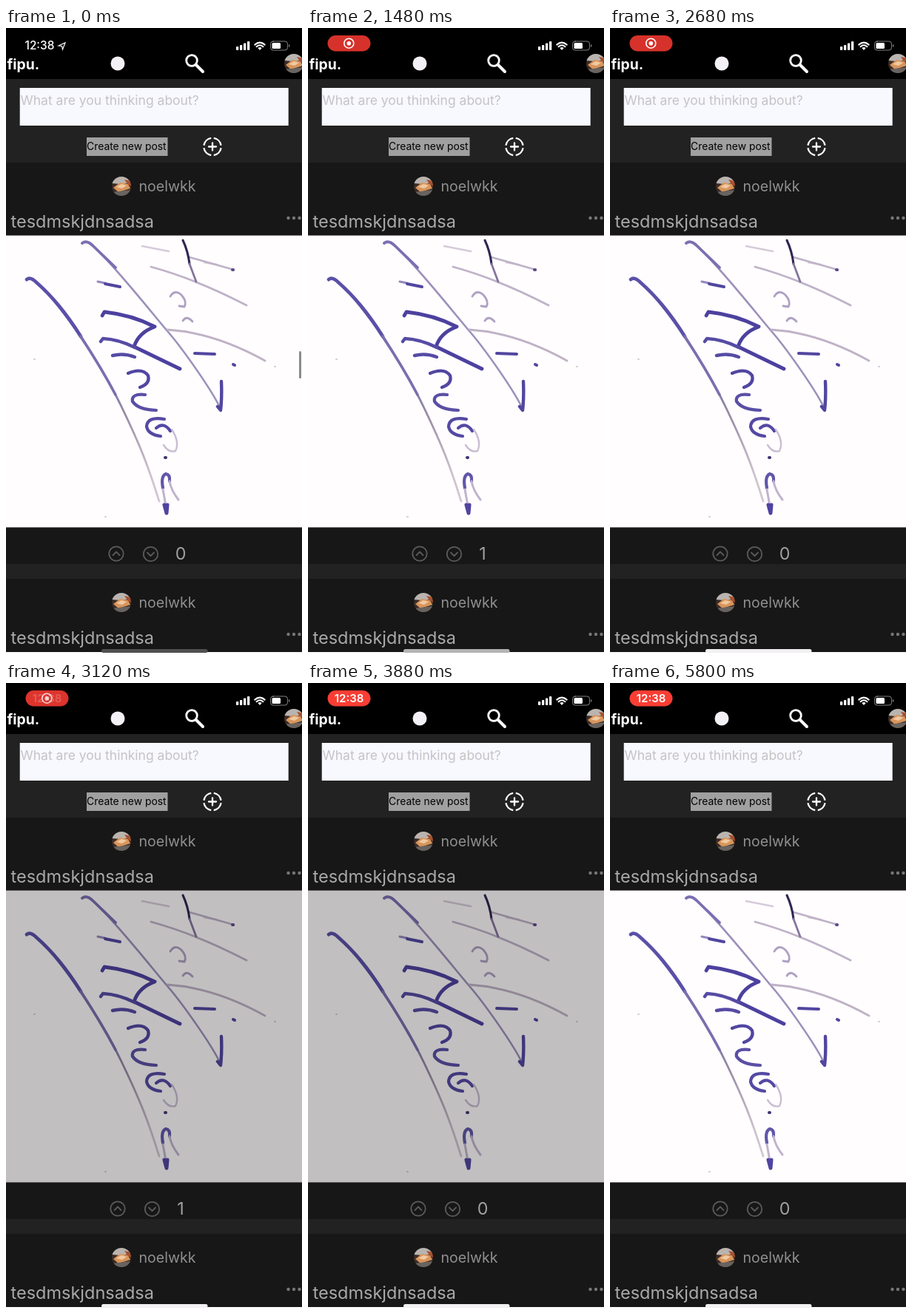
These frames come from a looping animation (400 by 848 pixels, 5840 ms). An HTML page:

```html
<!DOCTYPE html>
<html lang="en">
<head>
<meta charset="utf-8">
<title>Feed</title>
<style>
  html, body { margin: 0; width: 100%; height: 100%; overflow: hidden; background: #000; }
  svg { display: block; width: 100vw; height: 100vh; font-family: Inter, "Open Sans", sans-serif; }
  .line { fill: none; stroke-linecap: round; stroke-linejoin: round; }
</style>
</head>
<body>
<svg viewBox="0 0 400 848" preserveAspectRatio="none">
  <defs>
    <clipPath id="round"><circle r="13"/></clipPath>
    <filter id="soft" filterUnits="userSpaceOnUse" x="0" y="281" width="400" height="394">
      <feGaussianBlur stdDeviation=".6"/>
    </filter>
    <linearGradient id="fade" gradientUnits="userSpaceOnUse" x1="28" y1="340" x2="215" y2="655">
      <stop offset="0" stop-color="#5449a3"/>
      <stop offset=".4" stop-color="#7266ab"/>
      <stop offset=".62" stop-color="#988ca6"/>
      <stop offset=".85" stop-color="#cdc2ce"/>
      <stop offset="1" stop-color="#d5cad7"/>
    </linearGradient>
    <g id="avatar" clip-path="url(#round)">
      <rect x="-13" y="-13" width="26" height="26" fill="#3c2c27"/>
      <path d="M-13-13H13V-5L-2-3L-13-4Z" fill="#b9b4b0"/>
      <path d="M-11 2L-2-5L9-3L12 3L-4 8Z" fill="#d8955c"/>
      <path d="M-7 1L0-3L7-1L1 3Z" fill="#f0c9a0"/>
      <path d="M4-9L13-7V0L8-3Z" fill="#a94f2d"/>
      <path d="M-13 8L13 5V13H-13Z" fill="#69635f"/>
    </g>
    <g id="postHead">
      <use href="#avatar" x="156" y="214"/>
      <text x="179.500" y="221" font-size="19.600" fill="#8f8f8f">noelwkk</text>
      <text x="6.500" y="270" font-size="23.500" fill="#a9a9a9">tesdmskjdnsadsa</text>
      <g fill="#777"><circle cx="381.500" cy="257" r="2.200"/><circle cx="389" cy="257" r="2.200"/><circle cx="396.500" cy="257" r="2.200"/></g>
    </g>
  </defs>

  <rect width="400" height="848" fill="#222"/>
  <rect width="400" height="69" fill="#000"/>

  <!-- status bar -->
  <g id="clock" fill="#fff">
    <text x="25.500" y="29" font-size="15.400" font-weight="500">12:38</text>
    <path d="M71 24L80 20L76.500 29L75.500 24.500Z" fill="none" stroke="#fff" stroke-width="1.200"/>
  </g>
  <g id="pill">
    <rect id="pillBody" x="26.500" y="10" width="58" height="21.500" rx="10.750"/>
    <g id="record" fill="none" stroke="#fff">
      <circle cx="55.300" cy="20.700" r="6.500" stroke-width="1.600"/>
      <circle cx="55.300" cy="20.700" r="2.800" fill="#fff" stroke="none"/>
    </g>
    <text id="pillTime" x="55.500" y="26" font-size="15" font-weight="600" fill="#fff" text-anchor="middle">12:38</text>
  </g>
  <g fill="#fff">
    <rect x="311" y="25" width="3.300" height="5" rx="1"/>
    <rect x="316" y="23" width="3.300" height="7" rx="1"/>
    <rect x="321" y="20.500" width="3.300" height="9.500" rx="1"/>
    <rect x="326" y="18" width="3.300" height="12" rx="1"/>
    <path d="M343 30L340.300 27.100Q343 25 345.700 27.100Z"/>
    <rect x="359.500" y="20" width="11.500" height="8" rx="1.500"/>
    <path d="M382 22v4q1.500-.5 1.500-2t-1.500-2Z" opacity=".5"/>
  </g>
  <g class="line" stroke="#fff" stroke-width="2.100">
    <path d="M336.300 22.600Q343 16.500 349.700 22.600M338.600 25.200Q343 21.300 347.400 25.200"/>
    <rect x="357.500" y="18" width="23" height="12" rx="3.500" stroke-width="1" opacity=".5"/>
  </g>

  <!-- navigation -->
  <text x="1.500" y="56" font-size="19.300" font-weight="700" fill="#fff">fipu.</text>
  <circle cx="151" cy="48" r="9.500" fill="#f4f1f6"/>
  <g class="line" stroke="#fff">
    <circle cx="251" cy="44" r="7.300" stroke-width="2.800"/>
    <path d="M257 50L266 59" stroke-width="4"/>
  </g>
  <use href="#avatar" x="389" y="48"/>

  <!-- composer -->
  <rect x="18.700" y="81" width="363" height="51" fill="#f8f8ff"/>
  <text x="19.500" y="104" font-size="17.500" fill="#c4c4c7">What are you thinking about?</text>
  <rect x="109" y="148" width="109.500" height="25" fill="#a0a0a0"/>
  <text x="109" y="165" font-size="13.900" fill="#000">Create new post</text>
  <g class="line" stroke="#fff" stroke-width="2.300">
    <circle cx="279" cy="160.500" r="11.700" stroke-linecap="butt" pathLength="80" stroke-dasharray="16 4" stroke-dashoffset="-2"/>
    <path d="M274 160.500h10M279 155.500v10"/>
  </g>

  <!-- posts -->
  <rect y="182" width="400" height="543" fill="#171717"/>
  <rect y="745" width="400" height="103" fill="#171717"/>
  <use href="#postHead"/>
  <use href="#postHead" y="563"/>
  <rect y="280.600" width="400" height="394.800" fill="#080808"/>
  <g id="photo">
    <rect y="280.600" width="400" height="394.800" fill="#fffdfe"/>
    <g id="ink" class="line" filter="url(#soft)"></g>
  </g>
  <g id="votes" class="line" stroke="#5a5a5a" stroke-width="1.800">
    <circle cx="149" cy="711" r="9.700"/>
    <path d="M144.500 713L149 708.500L153.500 713"/>
    <circle cx="195.500" cy="711.500" r="9.700"/>
    <path d="M191 709.500L195.500 714L200 709.500"/>
  </g>
  <text id="count" x="236" y="719" font-size="23.300" fill="#a0a0a0" text-anchor="middle">0</text>
  <rect y="844" width="400" height="4" fill="#fff"/>
  <rect id="scrollbar" x="396" y="437" width="3" height="37" rx="1.500" fill="#8a8a8a"/>
  <rect id="home" x="129" y="840" width="143.500" height="5" rx="2.500"/>
</svg>
<script>
const LOOP = 5840;
const TAPS = [[520, 760], [2000, 2130], [2840, 2970], [3600, 3730]];
const PRESSED = 0.2;
const el = id => document.getElementById(id);

// colour, width, path of each pen stroke
const STROKES = [
  ["url(#fade)", 2.8, "M28 341Q32 335 41 344C76 375 130 458 156 512S192 592 207 640"],
  ["#5b50a8", 4.6, "M28 340Q33 336 41 344Q73 372 101 417"],
  ["#7b6faf", 3.6, "M101 417Q129 460 148 496"],
  ["#9c90bb", 2.6, "M103 291Q109 286 118 295C150 325 200 389 219 411S277 488 289 513"],
  ["#7a6fb2", 3.8, "M103 291Q109 286 118 295L148 324"],
  ["#5146a0", 4.4, "M291 478Q292 500 290 517L286 512"],
  ["#d6cbd8", 2.6, "M184 295L220 302M268 317L285 320"],
  ["#bfb2c8", 2.8, "M248 310L308 327M196 323Q258 340 325 375"],
  ["#2e2652", 3, "M239 287Q246 302 248 319"],
  ["#85759d", 2.8, "M248 319L257 343"],
  ["#5a4b8c", 4, "M306 327h1"],
  ["#aea1c3", 2.8, "M222 363Q228 353 237 361Q245 370 241 377L234 376M239 396Q244 388 252 397"],
  ["#bfb2c6", 2.8, "M218 408Q282 412 350 450"],
  ["#5146a0", 4, "M255 440L282 441M307 455L309 456"],
  ["#d5cad7", 2, "M363 458h1M38 448h1M134 661h1"],
  ["#9488bd", 3, "M124 343L134 345"],
  ["#5146a0", 4, "M134 346L154 350"],
  ["#4c419f", 4.8, "M130 389L133 384Q170 388 201 404Q179 412 173 431Q202 445 235 461"],
  ["#564ba5", 4.5, "M128 424L131 420Q152 421 174 432M144 443Q159 439 174 445"],
  ["#5146a2", 4.3, "M165 467Q184 459 192 470Q195 481 181 486"],
  ["#5a4fa6", 4.2, "M188 496Q169 494 171 505Q178 516 203 517"],
  ["#5449a3", 4.2, "M214 529Q191 525 190 539Q192 550 209 552M203 541Q213 532 222 545"],
  ["#c9bdd3", 2.4, "M224 543Q235 560 229 572Q220 575 213 564"],
  ["#40346f", 4, "M215 581h1"],
  ["#6156a9", 4.2, "M212 622Q209 606 216 603Q222 604 221 613"],
  ["#c0b3ce", 3, "M221 613Q223 625 233 638M212 624L216 646"],
  ["#4f44a1", 5, "M214 645L217 656L218 645"]
];
el("ink").innerHTML = STROKES.map(([color, width, d]) =>
  `<path d="${d}" stroke="${color}" stroke-width="${width}"/>`).join("");

const ramp = (t, from, to) => Math.min(1, Math.max(0, (t - from) / (to - from)));
const ease = p => p < 0.5 ? 2 * p * p : 1 - 2 * (1 - p) * (1 - p);
const mix = (a, b, p) => a + (b - a) * p;
const rgb = (a, b, p) => `rgb(${a.map((v, i) => Math.round(mix(v, b[i], p)))})`;
const fade = (id, opacity) => el(id).setAttribute("opacity", opacity);

function photoOpacity(t) {
  return TAPS.reduce((opacity, [down, up]) => {
    const press = ease(ramp(t, down, down + 130)) - ease(ramp(t, up, up + 250));
    return opacity - (1 - PRESSED) * press;
  }, 1);
}

function render(t) {
  const recording = ramp(t, 100, 400);
  const timeShown = ease(ramp(t, 2980, 3420));
  const votes = TAPS.filter(([, up]) => t >= up + 60).length % 2;

  fade("clock", 1 - recording);
  fade("pill", recording);
  fade("record", 1 - timeShown);
  fade("pillTime", timeShown);
  el("pillBody").setAttribute("fill", rgb([214, 50, 43], [250, 62, 52], timeShown));
  fade("scrollbar", 1 - ramp(t, 40, 360));
  fade("photo", photoOpacity(t));
  el("count").textContent = votes;
  el("votes").setAttribute("transform", `translate(${votes * 2})`);
  el("home").setAttribute("fill", rgb([80, 80, 80], [242, 240, 242], ramp(t, 0, 2400)));
}

const start = performance.now();
function tick() {
  render((performance.now() - start) % LOOP);
  requestAnimationFrame(tick);
}
tick();
</script>
</body>
</html>
```
